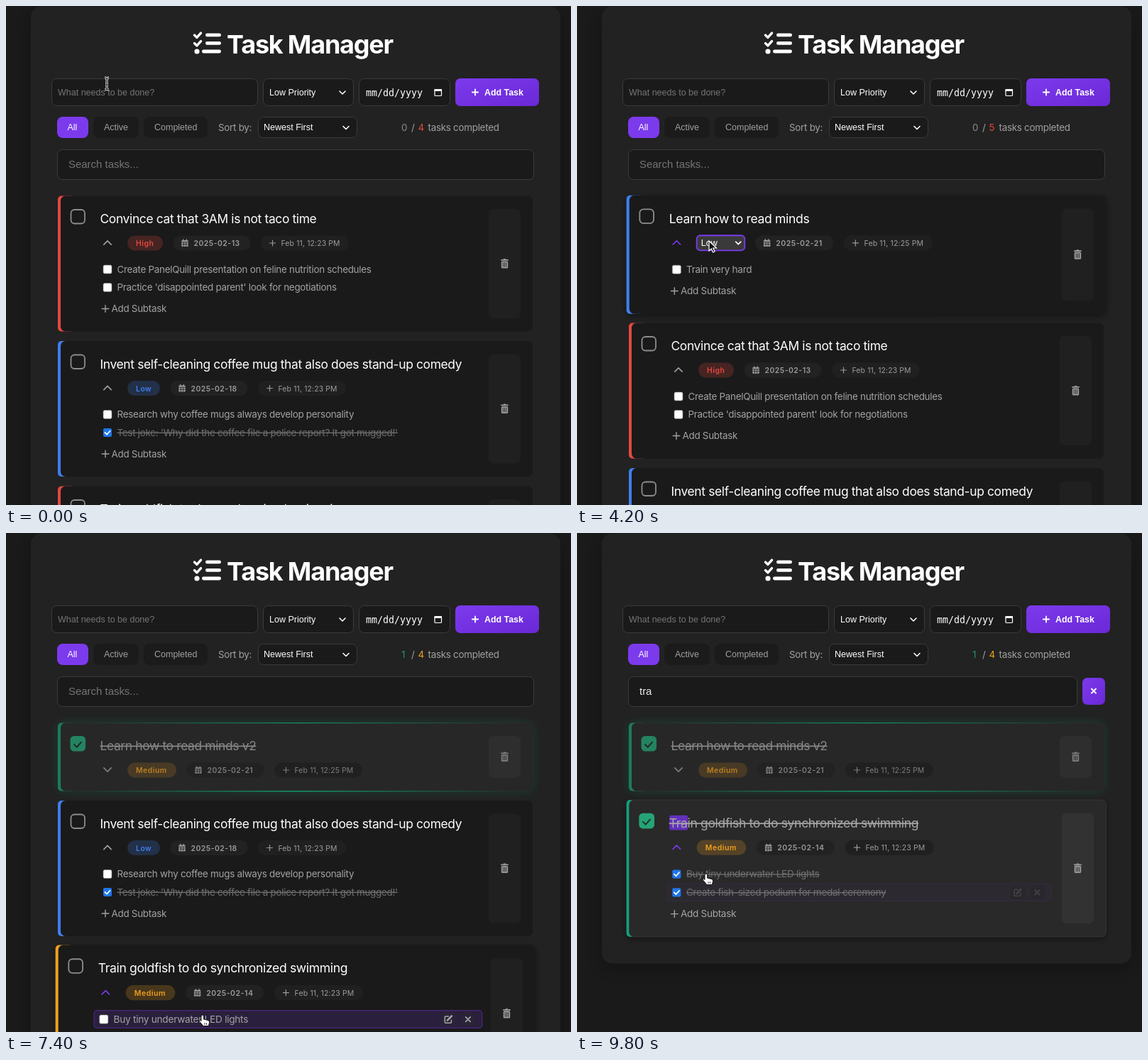
An HTML page for the animation above (10000 ms loop, 796x703 px).

```html
<!DOCTYPE html>
<html lang="en">
<head>
<meta charset="utf-8">
<title>Task Manager</title>
<style>
html, body { margin: 0; width: 100%; height: 100%; overflow: hidden; background: #1a1a1a; }
svg { display: block; width: 100%; height: 100%; }
text { white-space: pre; }
.heading { font: 700 36px Inter, sans-serif; letter-spacing: -1.2px; }
.title { font: 17.4px Inter, sans-serif; letter-spacing: -.02em; }
.body { font: 13.4px Inter, sans-serif; letter-spacing: -.02em; }
.badge { font: 600 10.4px Inter, sans-serif; letter-spacing: .5px; }
.stamp { font: 10.4px Inter, sans-serif; letter-spacing: .15px; }
.ui { font: 12.5px 'Liberation Sans', Arial, sans-serif; }
.bold { font: 700 12.4px 'Liberation Sans', Arial, sans-serif; }
.field { font: 14.95px 'Liberation Sans', Arial, sans-serif; }
.mono { font: 13.3px 'DejaVu Sans Mono', monospace; }
</style>
</head>
<body>
<svg viewBox="0 0 796 703">
  <defs>
    <linearGradient id="violet" x2="1" y2="1">
      <stop stop-color="#7c3aed"/><stop offset="1" stop-color="#6a28d6"/>
    </linearGradient>
    <linearGradient id="shine">
      <stop offset=".05" stop-color="#10b981" stop-opacity="0"/>
      <stop offset=".5" stop-color="#10b981"/>
      <stop offset=".95" stop-color="#10b981" stop-opacity="0"/>
    </linearGradient>
    <filter id="shadow" x="-10%" y="-20%" width="120%" height="140%">
      <feDropShadow dx="0" dy="3" stdDeviation="5" flood-opacity=".45"/>
    </filter>
    <filter id="glow" x="-10%" y="-40%" width="120%" height="180%">
      <feDropShadow dx="0" dy="0" stdDeviation="7" flood-color="#10b981" flood-opacity=".25"/>
    </filter>
    <filter id="panelShadow" x="-10%" y="-10%" width="120%" height="120%">
      <feDropShadow dx="0" dy="8" stdDeviation="14" flood-opacity=".3"/>
    </filter>
  </defs>
  <g id="stage"></g>
</svg>
<script>
const PURPLE = '#7c3aed', RED = '#e5483f', BLUE = '#3f7fee', AMBER = '#f0a020', GREEN = '#22966b';
const UI_FONT = "12.5px 'Liberation Sans', Arial, sans-serif";
const FIELD_FONT = "14.95px 'Liberation Sans', Arial, sans-serif";
const TITLE_FONT = '17.4px Inter, sans-serif';

// ---- drawing helpers ----
const pen = document.createElement('canvas').getContext('2d');
const measure = (string, font) => { pen.font = font; return pen.measureText(string).width; };
const rect = (x, y, w, h, r, fill, extra = '') =>
  `<rect x="${x}" y="${y}" width="${w}" height="${h}" rx="${r}" fill="${fill}" ${extra}/>`;
const text = (x, y, string, style, fill, extra = '') =>
  `<text x="${x}" y="${y}" class="${style}" fill="${fill}" ${extra}>${string}</text>`;
const stroke = (d, color, width = 1.5) =>
  `<path d="${d}" fill="none" stroke="${color}" stroke-width="${width}" stroke-linecap="round" stroke-linejoin="round"/>`;
const group = (content, attributes) => `<g ${attributes}>${content}</g>`;
const grow = (content, x, y) =>
  group(content, `transform="translate(${x} ${y}) scale(1.01) translate(${-x} ${-y})"`);

const plus = (x, y, r, color, width) => stroke(`M${x - r} ${y}h${2 * r}M${x} ${y - r}v${2 * r}`, color, width);
const cross = (x, y, r, color, width = 1.6) =>
  stroke(`M${x - r} ${y - r}l${2 * r} ${2 * r}m0 ${-2 * r}l${-2 * r} ${2 * r}`, color, width);
const chevron = (x, y, r, color, up) => {
  const dy = up ? -r : r;
  return stroke(`M${x - r} ${y - dy / 2}l${r} ${dy}l${r} ${-dy}`, color, 1.6);
};
const tick = (x, y, r, color, width) =>
  stroke(`M${x - r} ${y}l${r * .75} ${r * .75}l${r * 1.25} ${-r * 1.4}`, color, width);
const calendar = (x, y, color) =>
  rect(x - 4.7, y - 4, 9.4, 9, 1.2, color) +
  stroke(`M${x - 2.3} ${y - 5}v2M${x + 2.3} ${y - 5}v2`, color, 1.4) +
  stroke(`M${x - 4.5} ${y - 1.3}h9M${x - 4} ${y + 1.7}h8M${x - 1.6} ${y - 1}v5.5M${x + 1.6} ${y - 1}v5.5`, '#222', .8);
const trash = (x, y, color) =>
  rect(x - 5.5, y - 6, 11, 1.8, .8, color) + rect(x - 2, y - 7, 4, 2, 1, color) +
  rect(x - 4.7, y - 3.6, 9.4, 10, 1.5, color) +
  stroke(`M${x - 2.2} ${y - 1.5}v5.8m2.2 0v-5.8m2.2 0v5.8`, '#242424', .9);
const pencil = (x, y, color) =>
  stroke(`M${x} ${y - 4}h-4q-1 0-1 1v7q0 1 1 1h7q1 0 1-1v-3`, color, 1.4) +
  stroke(`M${x - 1.5} ${y + 1.5}l6-6`, color, 2.4);

const box = (x, y, w, h, r = 7, focused = false) =>
  (focused ? rect(x - 1.5, y - 1.5, w + 3, h + 3, r + 1.5, 'none', 'stroke="#7c3aed" stroke-opacity=".3" stroke-width="4"') : '') +
  rect(x + .5, y + .5, w - 1, h - 1, r, '#1a1a1a', `stroke="${focused ? PURPLE : '#3b3b3b'}"`);
const caret = (x, y, h) => rect(x + .5, y - h / 2, 1, h, 0, '#fff');

const pointers = {
  beam: '<path d="M-3-8q3 0 3 2q0-2 3-2M0-6v13M-3 9q3 0 3-2q0 2 3 2M-2 2h4" fill="none" stroke="#fff" stroke-width="3"/>' +
        '<path d="M-3-8q3 0 3 2q0-2 3-2M0-6v13M-3 9q3 0 3-2q0 2 3 2M-2 2h4" fill="none" stroke="#111" stroke-width="1.2"/>',
  arrow: '<path d="M0 0v14l3.3-3l2.3 5l2.4-1l-2.2-5h4.6z" fill="#111" stroke="#fff" stroke-width="1.2"/>',
  hand: '<path d="M-2 2q0-2 1.8-2t1.8 2v4l6 1.5q2 .6 2 3l-1.2 5h-7.500l-5-6q-1.500-2 .5-2.500l1.600 1.500z" fill="#fff" stroke="#111"/>' +
        '<path d="M3 11v3m2.500-3v3" stroke="#111" stroke-width=".8"/>'
};

// ---- story: each entry changes part of the state from its time on ----
const cat = {
  title: 'Convince cat that 3AM is not taco time', priority: 'High', date: '2025-02-13',
  subs: ['Create PanelQuill presentation on feline nutrition schedules', "Practice 'disappointed parent' look for negotiations"],
};
const mug = {
  title: 'Invent self-cleaning coffee mug that also does stand-up comedy', priority: 'Low', date: '2025-02-18',
  subs: ['Research why coffee mugs always develop personality', "Test joke: 'Why did the coffee file a police report? It got mugged!'"],
  checked: [1],
};
const fish = {
  title: 'Train goldfish to do synchronized swimming', priority: 'Medium', date: '2025-02-14',
  subs: ['Buy tiny underwater LED lights', 'Create fish-sized podium for medal ceremony'],
};
const plants = { title: 'Teach house plants to water themselves', priority: 'Low', date: '2025-02-20', subs: [] };
const learn = { title: 'Learn how to read minds', priority: 'Low', date: 'Due Date', time: '12:25', subs: [] };

const story = [
  [0, { cat, mug, fish, plants, learn, order: ['cat', 'mug', 'fish', 'plants'], count: ['0', '4'],
        zero: '#8a8a8a', scroll: 0, draft: '', query: '', mouse: [142, 109, 'beam'] }],
  [200, { focus: 'draft' }],
  [400, { mouse: null }],
  [1600, { mouse: [470, 116, 'arrow'] }],
  [1800, { mouse: [690, 124, 'hand'], lit: true }],
  [2000, { order: ['learn', 'cat', 'mug', 'fish', 'plants'], count: ['0', '5'], focus: '', zero: BLUE }],
  [2200, { mouse: [460, 240, 'arrow'], lit: false }],
  [2400, { mouse: [180, 373, 'hand'], hover: 'learn' }],
  [2600, { mouse: null, learn: { adding: true } }],
  [3600, { learn: { adding: false, subs: ['Train very hard'] }, mouse: [262, 334, 'hand'], zero: '#8a8a8a' }],
  [3800, { learn: { date: '2025-02-21' } }],
  [4000, { mouse: [190, 333, 'hand'] }],
  [4200, { learn: { select: true }, mouse: [186, 331, 'arrow'] }],
  [4400, { learn: { priority: 'Medium' }, mouse: [190, 350, 'arrow'] }],
  [4600, { learn: { select: false }, mouse: [240, 315, 'arrow'] }],
  [4800, { learn: { renaming: true }, mouse: null }],
  [5600, { learn: { renaming: false }, mouse: [98, 297, 'hand'] }],
  [5800, { learn: { done: true, closed: true }, hover: '', zero: GREEN }],
  [6200, { hover: 'cat', subHover: [0, 1], mouse: [162, 488, 'hand'] }],
  [6400, { cat: { checked: [0] } }],
  [6600, { subHover: null, mouse: [450, 478, 'arrow'] }],
  [6800, { mouse: [704, 470, 'hand'] }],
  [7000, { cat: { opacity: .4 } }],
  [7200, { order: ['learn', 'mug', 'fish', 'plants'], count: ['1', '4'], hover: 'mug', mouse: [500, 540, 'arrow'] }],
  [7400, { hover: 'fish', subHover: [0, 1], mouse: [277, 679, 'hand'] }],
  [7600, { fish: { checked: [0] } }],
  [7800, { scroll: 80, subHover: [1, 1], mouse: [230, 626, 'hand'] }],
  [8000, { fish: { checked: [0, 1] } }],
  [8200, { scroll: 0, hover: '', subHover: null, fish: { done: true, closed: true }, mouse: [260, 400, 'arrow'] }],
  [8400, { mouse: [240, 222, 'beam'] }],
  [8600, { focus: 'query', mouse: null }],
  [8800, { order: ['learn', 'fish'] }],
  [9200, { focus: '', mouse: [170, 350, 'arrow'] }],
  [9400, { hover: 'fish', mouse: [141, 438, 'hand'] }],
  [9600, { fish: { closed: false }, subHover: [1, 1], mouse: [190, 500, 'hand'] }],
  [9800, { subHover: [1, .22], mouse: [182, 480, 'hand'] }],
];

const merge = (target, patch) => {
  for (const [key, value] of Object.entries(patch))
    target[key] = value && value.constructor === Object ? merge({ ...target[key] }, value) : value;
  return target;
};
const typed = (string, start, end, t) =>
  string.slice(0, Math.max(0, Math.round(string.length * (t - start) / (end - start))));

function stateAt(t) {
  const s = story.filter(([from]) => from <= t).reduce((state, [, patch]) => merge(state, patch), {});
  if (s.focus === 'draft') s.draft = typed(learn.title, 200, 1400, t);
  s.learn.entry = typed('Train very hard', 2600, 3290, t);
  s.learn.title += typed(' v2', 4800, 5400, t);
  s.query = typed('tra', 8400, 9000, t);
  s.warm = t < 7000 ? RED : AMBER;
  return s;
}

// ---- parts ----
function header(s) {
  let out = tick(270, 41, 4.5, '#fff', 3.4) + tick(270, 52.500, 4.5, '#fff', 3.4) + '<circle cx="269" cy="64" r="3.6" fill="#fff"/>';
  out += rect(281, 38.500, 22, 4.8, 2.4, '#fff') + rect(281, 50, 22, 4.8, 2.4, '#fff') + rect(276, 61.600, 27, 4.8, 2.4, '#fff');
  out += text(311, 66.500, 'Task Manager', 'heading', '#fff');

  out += box(64, 102, 291, 39, 7, s.focus === 'draft') +
    text(73, 126, s.draft || 'What needs to be done?', 'ui', s.draft ? '#eee' : '#757575');
  if (s.focus === 'draft') out += caret(73 + measure(s.draft, UI_FONT), 121.500, 15);
  out += box(362, 102, 128, 39) + text(371, 126, 'Low Priority', 'ui', '#fff') + chevron(474, 122, 4, '#fff');
  out += box(497, 102, 129, 39) + text(507, 126.500, 'mm/dd/yyyy', 'mono', '#fff') +
    rect(604, 118, 9.5, 8.500, 1, 'none', 'stroke="#fff" stroke-width="1.2"') + rect(603.500, 117, 10.500, 3, 0, '#fff');
  out += rect(633, s.lit ? 101 : 102, 118, 39, 7, 'url(#violet)', s.lit ? 'filter="url(#shadow)"' : '') +
    plus(661, 121.500, 4.2, '#fff', 1.8) + text(674, 126, 'Add Task', 'bold', '#fff');

  out += rect(72, 156, 44, 30, 8, PURPLE) + text(86.500, 175, 'All', 'ui', '#fff');
  out += rect(123, 156, 64, 30, 8, '#1b1b1b') + text(138, 175, 'Active', 'ui', '#a0a0a0');
  out += rect(194, 156, 90, 30, 8, '#1b1b1b') + text(209, 175, 'Completed', 'ui', '#a0a0a0');
  out += text(299, 176, 'Sort by:', 'body', '#a0a0a0') + box(355, 156, 140, 30) +
    text(363, 175, 'Newest First', 'ui', '#fff') + chevron(479, 171.500, 4, '#fff');
  const [finished, total] = s.count;
  out += text(557, 176, finished, 'body', s.zero) + text(571, 176, '/', 'body', '#a0a0a0') +
    text(580.500, 176, total, 'body', s.warm) + text(594.500, 176, 'tasks completed', 'body', '#a0a0a0');

  out += box(72, 202, s.query ? 633 : 672, 43, 7, s.focus === 'query') +
    text(88, 228, s.query || 'Search tasks...', 'field', s.query ? '#eee' : '#757575');
  if (s.focus === 'query') out += caret(88 + measure(s.query, FIELD_FONT), 223, 17);
  if (s.query) out += rect(712, 204, 32, 38, 7, 'url(#violet)') + cross(728, 222.500, 3, '#fff', 1.9);
  return out;
}

function meta(task, y, hovered, warm) {
  const color = { High: RED, Low: BLUE, Medium: warm }[task.priority];
  const width = task.select ? 67 : { High: 50, Low: 46, Medium: 69 }[task.priority];
  let x = task.subs.length ? 171 : 130;
  let out = task.subs.length ? chevron(143, y + 66, 5.2, hovered ? PURPLE : '#a0a0a0', !task.closed) : '';
  if (task.select) {
    out += rect(x, y + 56, width, 21, 5, '#3a3a3a', `stroke="${PURPLE}" stroke-width="1.8"`) +
      text(x + 6, y + 71, task.priority, 'ui', '#fff') + chevron(x + 58, y + 66.500, 3.5, '#fff');
  } else {
    out += rect(x, y + 56, width, 21, 10.5, color, 'fill-opacity=".22"') +
      text(x + 12, y + 70.500, task.priority, 'badge', color);
  }
  x += width + 14.5;
  const dateWidth = task.date === 'Due Date' ? 92 : 109;
  out += rect(x, y + 56, dateWidth, 21, 10.5, '#222') + calendar(x + 16.500, y + 66.500, '#999') +
    text(x + 29, y + 70.500, task.date, 'badge', '#9c9c9c');
  x += dateWidth + 14.5;
  return out + rect(x, y + 56, 124, 21, 10.5, '#202020') + plus(x + 16.500, y + 66.500, 4, '#999', 1.2) +
    text(x + 28.500, y + 70.500, `Feb 11, ${task.time || '12:23'} PM`, 'stamp', '#9c9c9c');
}

function subtask(label, y, checked, alpha) {
  let row = checked
    ? rect(137, y - 6, 12, 12, 2, '#1f76e6') + tick(143, y, 3.5, '#fff', 1.8)
    : rect(137, y - 6, 12, 12, 2, '#fff', 'stroke="#777" stroke-width=".6"');
  row += text(156.500, y + 4.7, label, 'body', checked ? '#707070' : '#a3a3a3', checked ? 'text-decoration="line-through"' : '');
  if (!alpha) return row;
  const tint = rect(129.500, y - 12, 536, 24, 4, PURPLE, `fill-opacity=".16" stroke="${PURPLE}" stroke-opacity=".55"`) +
    rect(609, y - 9, 20, 18, 4, '#2b2438') + rect(636, y - 9, 20, 18, 4, '#2b2438') +
    pencil(619, y, '#aaa') + cross(646, y, 3.2, '#aaa');
  row = group(tint, `opacity="${alpha}"`) + row;
  return alpha === 1 ? grow(row, 397.5, y) : row;
}

const cardHeight = task => 96 + (task.closed ? 0 : task.adding ? 60 : 44 + 25.5 * task.subs.length);

function card(task, y, hovered, s) {
  const h = cardHeight(task), { done } = task;
  const edge = done ? (hovered ? '#10a27a' : '#1b9a6c') : { High: RED, Low: BLUE, Medium: s.warm }[task.priority];
  const filter = hovered ? 'shadow' : done ? 'glow' : '';
  let out = rect(73, y, 669, h, 7, done ? '#292929' : '#1a1a1a', filter && `filter="url(#${filter})"`);
  out += rect(73, y, 24, h, 5, edge) +
    rect(77, y, 665, h, 7, done ? '#292929' : '#1a1a1a', done && hovered ? 'stroke="#363636"' : '');
  if (done && !hovered) out += rect(77, y - .5, 665, 1.2, 0, 'url(#shine)') + rect(77, y + h - .5, 665, 1.6, 0, 'url(#shine)');

  out += done
    ? rect(90.500, y + 18.500, 21.500, 21.500, 5.5, '#25a477') + tick(101, y + 30.500, 5, '#1c3329', 2)
    : rect(91.500, y + 19.500, 19.500, 19.500, 5, 'none', 'stroke="#8d8d8d" stroke-width="1.8"');

  if (task.renaming) {
    out += box(130, y + 18, 535, 29, 5, true) + text(136, y + 38, task.title, 'field', '#fff') +
      caret(136 + measure(task.title, FIELD_FONT), y + 32.500, 17);
  } else {
    const match = s.query.length > 1 && task.title.toLowerCase().startsWith(s.query) ? s.query.length : 0;
    const marked = task.title.slice(0, match);
    if (match) out += rect(133, y + 21.500, measure(marked, TITLE_FONT) - match * .35, 20.500, 2, '#6430bd');
    out += text(132.500, y + 38.500, task.title, 'title', done ? '#a8a8a8' : '#fff', done ? 'text-decoration="line-through"' : '');
  }
  out += meta(task, y, hovered, s.warm);

  out += rect(680, y + 18.500, 45, h - 37, 7, done ? '#323232' : '#202020') + trash(702.500, y + h / 2, '#999');

  if (task.adding) {
    const mid = y + 122;
    out += box(130, mid - 15, 478, 30, 6, true) +
      rect(131, mid - 14, 476, 28, 5, 'none', `stroke="${PURPLE}" stroke-width="1.5"`) +
      text(136, mid + 5, task.entry, 'field', '#fff') + caret(136 + measure(task.entry, FIELD_FONT), mid, 17);
    out += rect(616, mid - 11.5, 23, 23, 5, '#3a3a3a') + tick(627.5, mid, 4.5, '#fff', 1.9) +
      rect(643, mid - 11.5, 23, 23, 5, '#3a3a3a') + cross(654.500, mid, 3.4, '#fff', 2);
  } else if (!task.closed) {
    task.subs.forEach((label, i) => {
      const alpha = hovered && s.subHover && s.subHover[0] === i ? s.subHover[1] : 0;
      out += subtask(label, y + 103.5 + 25.5 * i, (task.checked || []).includes(i), alpha);
    });
    const mid = y + 108 + 25.5 * task.subs.length;
    out += plus(140, mid, 4.8, '#a3a3a3', 1.4) + text(148.500, mid + 4.7, 'Add Subtask', 'body', '#a3a3a3');
  }
  const opacity = task.opacity || (done && !hovered ? .75 : 1);
  out = group(out, `opacity="${opacity}"`);
  return hovered ? grow(out, 407.5, y + h / 2) : out;
}

function scene(t) {
  const s = stateAt(t);
  let y = 267.5, list = '', front = '';
  for (const id of s.order) {
    const hovered = s.hover === id, drawn = card(s[id], y, hovered, s);
    if (hovered) front = drawn; else list += drawn;
    y += cardHeight(s[id]) + 13.5;
  }
  const panel = rect(35, .5, 746, y + 24.5, 15, '#232323', 'filter="url(#panelShadow)"');
  const page = group(panel + header(s) + list + front, `transform="translate(0 ${-s.scroll})"`);
  const pointer = s.mouse ? group(pointers[s.mouse[2]], `transform="translate(${s.mouse[0]} ${s.mouse[1]})"`) : '';
  return page + pointer;
}

// ---- playback in 200 ms steps ----
const LOOP = 10000, STEP = 200, stage = document.getElementById('stage');
const start = performance.now();
let shown = -1;
function play() {
  const t = Math.floor((performance.now() - start) % LOOP / STEP) * STEP;
  if (t !== shown) stage.innerHTML = scene(shown = t);
  requestAnimationFrame(play);
}
play();
</script>
</body>
</html>
```
